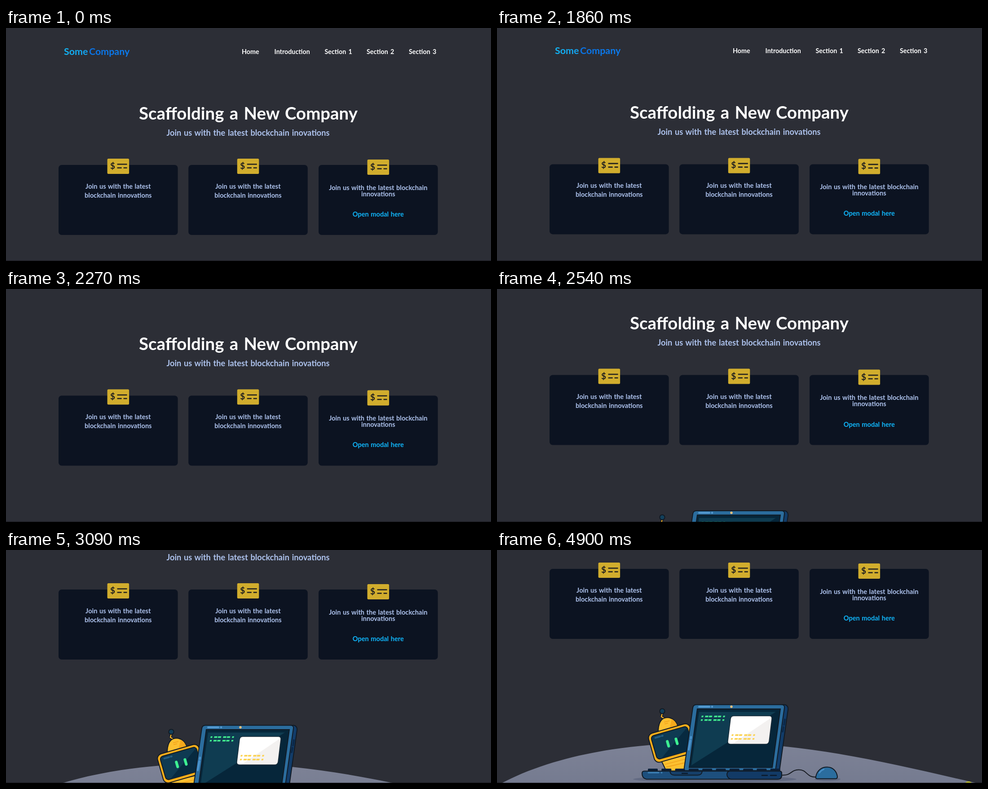
Write an HTML page that moves like this. It is 1080 px wide and 519 px high and loops after 4970 ms.

```html
<!DOCTYPE html>
<html lang="en">
<head>
<meta charset="utf-8">
<title>Scaffolding a New Company</title>
<style>
  html, body { margin: 0; width: 100%; height: 100%; overflow: hidden; background: #2c2e36; }
  svg { display: block; width: 100vw; height: 100vh; }
  text { font-family: Lato, "Open Sans", sans-serif; font-weight: 700; }
  .logo { font-size: 21.4px; }
  .nav { font-size: 14.3px; fill: #fff; word-spacing: 1.6px; }
  .title { font-size: 38.4px; fill: #fff; word-spacing: 3px; }
  .sub { font-size: 18.2px; fill: #aec3ee; word-spacing: 1.3px; }
  .note { font-size: 14.6px; fill: #aec3ee; word-spacing: 1px; }
  .link { fill: #10b7fc; }
  .mid { text-anchor: middle; }
  .ink { stroke: #111a24; stroke-width: 2; stroke-linejoin: round; stroke-linecap: round; }
</style>
</head>
<body>
<svg viewBox="0 0 1080 519" preserveAspectRatio="none">
  <defs>
    <linearGradient id="some"><stop stop-color="#12b4f2"/><stop offset="1" stop-color="#12a2f0"/></linearGradient>
    <linearGradient id="comp"><stop stop-color="#0a72e4"/><stop offset="1" stop-color="#0a7cf0"/></linearGradient>
    <linearGradient id="moon" x2="0" y2="1"><stop stop-color="#7d8296"/><stop offset="1" stop-color="#757b90"/></linearGradient>
    <clipPath id="win"><path d="M527 370H606Q613 370 612 377L606 426Q605 433 598 433H520Q513 433 514 426L520 377Q521 370 527 370Z"/></clipPath>
    <g id="check">
      <rect width="48.5" height="34" rx="2.5" fill="#d1ad2d"/>
      <text class="mid" x="12" y="23" font-size="19" fill="#201f1f">$</text>
      <path d="M22 12.5H44M22 20.5H32M36 20.5H44" stroke="#201f1f" stroke-width="2.6"/>
    </g>
  </defs>

  <g id="page">
    <text class="logo" x="129" y="60" fill="url(#some)">Some</text>
    <text class="logo" x="185" y="60" fill="url(#comp)">Company</text>
    <g id="nav"></g>
    <text class="title mid" x="539.5" y="203.5">Scaffolding a New Company</text>
    <text class="sub mid" x="539" y="239.5">Join us with the latest blockchain inovations</text>
    <g id="cards"></g>

    <g transform="translate(0 262.5)">
      <path fill="url(#moon)" d="M12 519C110 468 230 444 340 435C430 428 540 428 640 438C780 452 930 488 1065 519V521H12Z"/>
      <ellipse cx="485" cy="511" rx="182" ry="7" fill="#626a82"/>
      <ellipse cx="736" cy="511" rx="29" ry="4" fill="#626a82"/>

      <!-- robot -->
      <path d="M368 364L366 372L375 377" fill="none" stroke="#111a24" stroke-width="5" stroke-linejoin="round"/>
      <path d="M368 364L366 372L375 377" fill="none" stroke="#f9b526" stroke-width="2.4"/>
      <circle class="ink" cx="368" cy="359.5" r="5.6" fill="#12405c"/>
      <path class="ink" fill="#fdc030" d="M359 407C359 388 364 376 376 374C389 372 399 381 403 395Z"/>
      <path fill="#f5a81c" d="M389 377C396 380 400 387 402 394L384 399Z"/>
      <path d="M372 384L384 381M373 388L381 386" stroke="#f1a21a" stroke-width="1.5"/>
      <path class="ink" fill="#fdc030" d="M366 470L378 495H430V455Z"/>
      <path d="M374 478L420 466M377 484L420 474" stroke="#f1a21a" stroke-width="1.8"/>
      <g transform="rotate(-16 390 430)">
        <rect class="ink" x="342" y="397" width="96" height="67" rx="11" fill="#f9ae1a"/>
        <rect class="ink" x="348" y="403" width="84" height="54" rx="7" fill="#0f3a52"/>
        <path fill="#072a40" d="M432 406V450Q432 457 425 457H357Z"/>
        <path d="M357 409H368M372 409H374" stroke="#245d82" stroke-width="4" stroke-linecap="round"/>
        <path d="M380.5 424V435M400.5 424V435" stroke="#3df092" stroke-width="6" stroke-linecap="round"/>
      </g>

      <!-- laptop lid -->
      <path class="ink" fill="#123c69" d="M634 345H641Q649 347 648 356L629 492H608Z"/>
      <path d="M641 378L639 390M638 395L636 405" stroke="#0b2848" stroke-width="4" stroke-linecap="round"/>
      <path class="ink" fill="#2b6d9e" d="M444 345H633Q641 345 640 352L620 492H416L436 352Q437 345 444 345Z"/>
      <path fill="#06263a" stroke="#111a24" stroke-width="2" d="M446 354.5H631L613 485H428Z"/>
      <path fill="#0f3c51" d="M450 361H621L433 480Z"/>
      <path d="M450 349.5H473" stroke="#559ad0" stroke-width="4" stroke-linecap="round"/>
      <circle cx="479" cy="349.5" r="2.3" fill="#559ad0"/>
      <circle cx="522" cy="349.5" r="2.7" fill="#f4c078"/>
      <path d="M432 417L431.5 420M430.5 425L427 445" stroke="#4a92cb" stroke-width="4.5" stroke-linecap="round"/>
      <g clip-path="url(#win)">
        <path fill="#fff" d="M510 368H616V436H510Z"/>
        <path fill="#f3f1f0" d="M614 372V436H519Z"/>
      </g>
      <path fill="none" stroke="#182a36" stroke-width="1.5" d="M527 370H606Q613 370 612 377L606 426Q605 433 598 433H520Q513 433 514 426L520 377Q521 370 527 370Z"/>
      <g id="code"></g>

      <!-- laptop base -->
      <g id="keys" fill="#0c2039"></g>
      <path class="ink" fill="#1d4f7d" d="M328 493H629Q634 493 634 498V502Q634 511 625 511H333Q323 509 323 498Q323 493 328 493Z"/>
      <path class="ink" fill="#123a66" d="M518 493H629Q634 493 634 498V502Q634 511 625 511H521Q513 509 512 501Q512 494 518 493Z"/>
      <path class="ink" fill="#163f69" d="M385 493H457Q456 502 447 502H395Q386 502 385 493Z"/>
      <path d="M412 498H424M590 502.500H602M609 502.500H622" stroke="#0b1828" stroke-width="2.6" stroke-linecap="round"/>
      <path d="M337 496.500H360M366 496.500H367" stroke="#3f83b8" stroke-width="3" stroke-linecap="round"/>

      <!-- mouse -->
      <path fill="none" stroke="#15191f" stroke-width="2" d="M635 502C656 503 654 490 672 490C692 490 688 508 712 506"/>
      <path class="ink" fill="#2b6d9e" d="M713 510Q709 510 710 505C713 491 723 484 735 484C748 484 756 493 758 505Q758 510 754 510Z"/>
      <path fill="none" stroke="#4a92cb" stroke-width="2.5" stroke-linecap="round" d="M718 497Q722 491 728 489"/>
    </g>
  </g>
  <circle id="pointer" r="9" fill="#b9bb28" fill-opacity=".92"/>
  <rect y="518" width="1080" height="1" fill="#000" fill-opacity=".5"/>
</svg>

<script>
const $ = id => document.getElementById(id);
const label = (cls, x, y, s) => `<text class="${cls}" x="${x}" y="${y}">${s}</text>`;

$('nav').innerHTML = [
  [525, 'Home'], [597.5, 'Introduction'], [709.5, 'Section 1'], [803, 'Section 2'], [897, 'Section 3']
].map(([x, s]) => label('nav', x, 58, s)).join('');

function card(x, iconY, lines, link) {
  const mid = x + 132.8;
  return `<rect x="${x}" y="305" width="265.6" height="156" rx="7" fill="#0c1321"/>` +
    `<use href="#check" x="${mid - 24.2}" y="${iconY}"/>` +
    lines.map(([y, s]) => label('note mid', mid, y, s)).join('') +
    (link ? label('note link mid', mid, 420, link) : '');
}
const wide = [[358, 'Join us with the latest'], [378, 'blockchain innovations']];
const tight = [[360.5, 'Join us with the latest blockchain'], [374.5, 'innovations']];
$('cards').innerHTML = card(117, 291, wide) + card(406.2, 291, wide) + card(696, 293, tight, 'Open modal here');

// Slanted code dashes: [start, width] pairs along one row
const dashes = [[0, 4], [8, 7], [16.5, 7], [28, 7], [36.5, 7], [48, 4]];
const row = (x, y, color) => dashes.map(([dx, w]) =>
  `<path fill="${color}" d="M${x + dx + 1} ${y}h${w}l-1 3.6h${-w}z"/>`).join('');
$('code').innerHTML = row(455, 369.5, '#42ee90') + row(453.5, 377.5, '#42ee90') +
  row(522, 411, '#fbd251') + row(520.5, 419.5, '#fbd251');

$('keys').innerHTML = Array.from({ length: 10 }, (_, i) =>
  `<rect x="${336 + i * 30.3}" y="487.5" width="22" height="6" rx="1.5"/>`).join('');

const LOOP = 4970;
// Scroll curve: [time, offset, speed]
const curve = [
  [1800, 0, 0], [1860, 1.6, .1], [2060, 33, .165], [2540, 113.5, .178],
  [3090, 217, .18], [3300, 251, .125], [3440, 263, 0]
];
// Moments at which the picture refreshes while scrolling
const ticks = [1860, 1930, 1990, 2060, 2130, 2200, 2270, 2340, 2410, 2480, 2540, 2610,
  2670, 2740, 2800, 2870, 2940, 3010, 3090, 3160, 3230, 3300, 3370, 3440];
// Pointer highlight: [time, x, y], hidden without a place
const pointer = [[0], [70, 1082, 466.5], [140], [4230, 1079, 426], [4300, 1067, 468],
  [4360, 1059, 511], [4430], [4900, 1050, 524]];

function offset(t) {
  if (t <= curve[0][0]) return 0;
  const i = curve.findIndex(k => t <= k[0]);
  const [t0, y0, v0] = curve[i - 1], [t1, y1, v1] = curve[i];
  const d = t1 - t0, u = (t - t0) / d, w = 1 - u;
  return w * w * ((1 + 2 * u) * y0 + u * d * v0) + u * u * ((3 - 2 * u) * y1 - w * d * v1);
}

function draw(t) {
  const tick = ticks.filter(k => k <= t).pop() || 0;
  $('page').setAttribute('transform', `translate(0 ${-offset(tick).toFixed(2)})`);
  const [, x = -50, y = -50] = pointer.filter(k => k[0] <= t).pop();
  $('pointer').setAttribute('cx', x);
  $('pointer').setAttribute('cy', y);
}

const start = performance.now();
function loop() {
  draw((performance.now() - start) % LOOP);
  requestAnimationFrame(loop);
}
loop();
</script>
</body>
</html>
```
